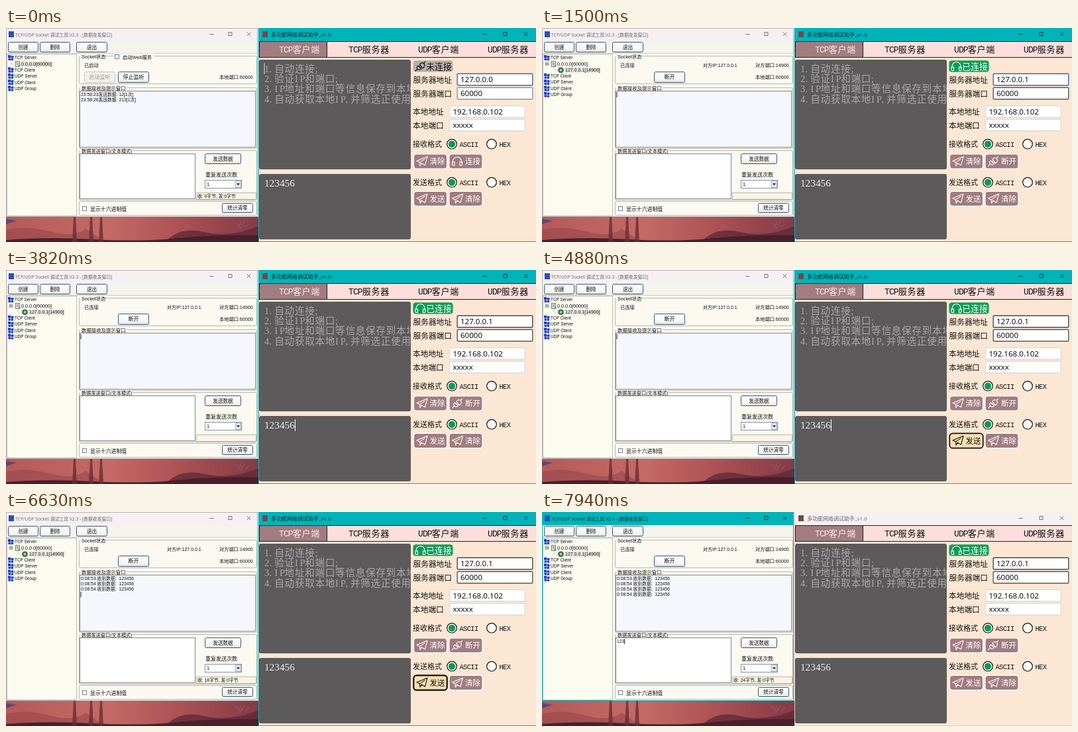
An HTML page for the animation above (8000 ms loop, 800 px wide and 324 px high).

```html
<!DOCTYPE html>
<html lang="zh-CN">
<head>
<meta charset="utf-8">
<title>TCP debugging demo</title>
<style>
html, body { margin: 0; width: 100%; height: 100%; overflow: hidden; }
svg { display: block; width: 100vw; height: 100vh; }
text { white-space: pre; font-family: "Liberation Sans", "Noto Sans CJK SC", "Noto Sans CJK", sans-serif; }
.ui { font-family: "Open Sans", "Noto Sans CJK SC", "Noto Sans CJK", sans-serif; }
.mono { font-family: "Liberation Mono", "Noto Sans CJK SC", "Noto Sans CJK", monospace; }
.song { font-family: "Liberation Serif", "Noto Sans CJK SC", "Noto Sans CJK", serif; }
.icon { fill: none; stroke-width: 1.1; stroke-linejoin: round; stroke-linecap: round; }
</style>
</head>
<body>
<svg id="stage" viewBox="0 0 800 324" xmlns="http://www.w3.org/2000/svg"></svg>
<script>
const LOOP = 8000;
const CONNECT = 1380;
const SENDS = [5130, 5880, 6350, 6700];
const STAMPS = ['0:08:53', '0:08:54', '0:08:54', '0:08:54'];
const TEAL = '#00b4b9', PALE = '#f6f0f3', PEACH = '#fbe7d3', MAUVE = '#a17c80', PANE = '#fcf9f1';

const rect = (x, y, w, h, fill, more = '') =>
  `<rect x="${x}" y="${y}" width="${w}" height="${h}" fill="${fill}" ${more}/>`;
const box = (x, y, w, h, fill, stroke, more = '') =>
  rect(x + .5, y + .5, w - 1, h - 1, fill, `stroke="${stroke}" ${more}`);
const path = (d, more = '') => `<path d="${d}" ${more}/>`;
const text = (x, y, s, size, fill = '#111', more = '') =>
  `<text x="${x}" y="${y}" font-size="${size}" fill="${fill}" ${more}>${s}</text>`;
const group = (id, body, more = '') => `<g id="${id}" ${more}>${body}</g>`;

// Fixed-pitch text: Han characters take a full cell, the rest half a cell.
function cells(x, y, s, cell, fill, font, size = cell) {
  const xs = [];
  for (const c of s) {
    xs.push(x.toFixed(1));
    x += c > '\u2e80' ? cell : cell / 2;
  }
  return text(xs.join(' '), y, s, size, fill, `class="${font}"`);
}

// closeX is the centre of the close button, gap the pitch of the three buttons.
function titleBar(id, x, w, label, labelX, size, iconFill, iconX, closeX, gap) {
  const mid = closeX - gap, low = closeX - 2 * gap;
  return rect(x, 0, w, 20, PALE, `id="${id}Bar"`) +
    rect(iconX, 5, 8, 9, iconFill) +
    group(id + 'Title', text(labelX, 13, label, size, 'currentColor', 'class="ui"') +
      path(`M${low - 3} 9.5h6M${mid - 2.5} 6.5h5v5h-5zM${closeX - 2.7} 6.5l5.5 5.5m0 -5.5l-5.5 5.5`,
        'fill="none" stroke="currentColor" stroke-width=".9"'));
}

/* ---- desktop ---- */

function desktop() {
  let s = rect(0, 284, 382, 40, 'url(#dusk)');
  s += path('M0 306Q30 298 66 308T120 304L150 324H0Z', 'fill="#9a474b" opacity=".6"');
  s += path('M240 324Q262 300 300 309T382 300V324Z', 'fill="#5f2734" opacity=".75"');
  s += path('M0 321Q60 316 130 320T260 318T382 314V324H0Z', 'fill="#48202c"');
  s += path('M102 286h3l2 38h-7zM127 286h3l2 38h-7zM142 286h3l2 38h-7z', 'fill="#6b2c36" opacity=".8"');
  s += path('M0 289l16 3-16 5z', 'fill="#5a4878"');
  s += path('M345 294l7 5m3 -6l-4 10m9 -11l-7 13m13 -9l-4 5', 'stroke="#8479b5" stroke-width=".8" opacity=".7"');
  return s;
}

/* ---- left window ---- */

const plain = (x, y, s, size = 7.3, fill, more) => text(x, y, s, size, fill, more);

function button(x, y, w, h, label, size = 7.6, off = false) {
  return box(x, y, w, h, off ? '#f3f2ea' : 'url(#face)', off ? '#c5c3b8' : '#38577d', 'rx="2"') +
    plain(x + w / 2, y + h / 2 + 2.9, label, size, off ? '#9a998f' : '#111', 'text-anchor="middle"');
}

function frame(x, y, w, h, label, labelW, size = 7.2) {
  return box(x, y, w, h, 'none', '#b9b8ac', 'rx="2"') +
    (label ? rect(x + 2, y - 2, labelW + 3, 5, PANE) + plain(x + 4, y + 3.6, label, size) : '');
}

const netIcon = y => path(`M3 ${y - 4}h4v4h-4zM7.5 ${y - 3}h4v3.4h-4zM3.5 ${y + .6}h3.4v3.4h-3.4zM7.5 ${y + 1}h3.6v3h-3.6z`,
  'fill="#1c3fc8"');
const node = (y, s) => netIcon(y) + plain(13, y + 2.4, s, 6.4);

function leftWindow() {
  const check = (x, y) => box(x, y, 7, 7, '#fff', '#4a6480', 'stroke-width=".8"');
  const stem = 'fill="none" stroke="#8a8a8a" stroke-width=".7" stroke-dasharray="1 1"';

  let s = rect(0, 0, 380, 286, PANE);
  s += titleBar('left', 0, 380, 'TCP/UDP Socket 调试工具 V2.3 - [数据收发窗口]', 14, 6.8, '#2450c0', 4, 366.5, 28);
  s += rect(1, 20, 378, 18, '#f4f3ec') + rect(1, 38, 378, 1, '#cfcec4');
  s += button(3, 21, 46, 16, '创建') + button(51, 21, 46, 16, '删除') + button(106, 21, 47, 16, '退出');

  s += box(1, 39, 106, 246, '#fbfbf0', '#bdbcb2');
  s += node(45, 'TCP Server');
  s += path('M7.5 49V54.5H14', stem) + rect(22, 50, 49, 9, '#e9e8df', 'id="rootMark"');
  s += box(14, 50, 7, 9, '#e6ebe4', '#59605c', 'stroke-width=".8"') +
    path('M16 53h3m-3 2h3m-1 2h4', 'stroke="#33804a" stroke-width=".9"');
  s += plain(23, 57, '0.0.0.0[60000]', 7.2);
  s += group('child', box(5, 52, 5, 5, '#fff', '#777', 'stroke-width=".8"') +
    path('M6 54.5h3', 'stroke="#111" stroke-width=".7"') +
    path('M18 59.5V64H24', stem) + rect(34, 59.5, 55, 9, '#e9e8df') +
    '<circle cx="28.5" cy="63.8" r="3.8" fill="#3d9b52" stroke="#23352a"/><circle cx="28.5" cy="63.8" r="1.3" fill="#d8f0dc"/>' +
    plain(35, 66.3, '127.0.0.1[14900]', 7));
  s += group('others', ['TCP Client', 'UDP Server', 'UDP Client', 'UDP Group']
    .map((name, i) => node(63.5 + i * 9.3, name)).join(''));

  s += frame(110, 42, 269, 43, 'Socket状态', 34);
  s += group('idle', rect(163, 38.5, 60, 9, PANE) + check(164, 40) + plain(176, 46.6, '启动Web服务') +
    plain(118, 59, '已启动') + button(118, 66, 47, 17, '启动监听', 8, true) + button(169, 66, 47, 17, '停止监听', 8));
  s += group('linked', plain(118, 59, '已连接') + plain(243, 58.5, '对方IP:127.0.0.1', 7) +
    plain(322, 58.5, '对方端口:14900', 7.2) + button(169, 66, 47, 17, '断开', 8));
  s += plain(322, 77, '本地端口:60000', 7.2);

  s += frame(110, 90, 269, 93, '数据接收及提示窗口', 67, 7.4);
  s += box(111, 95, 266, 86, '#f6f7fd', '#80858c');
  s += group('oldLog', plain(113, 103, '23:58:23发送数据: 12[1次]', 6.8) + plain(113, 111.2, '23:58:26发送数据: 213[1次]', 6.8));
  s += STAMPS.map((stamp, i) => group('log' + i, plain(113, 103 + i * 8, stamp + ' 收到数据:  123456', 6.8))).join('');
  s += rect(112.6, 97, .9, 8, '#111', 'id="logCaret"');

  s += frame(110, 185, 269, 76, '数据发送窗口(文本模式)', 76, 7.2);
  s += box(111, 190, 175, 69, '#fff', '#80858c');
  s += plain(113, 198, '', 6.8, '#111', 'id="typed"') + rect(123.6, 192, .9, 8, '#111', 'id="typedCaret"');
  s += button(300, 190, 55, 16, '发送数据');
  s += plain(301, 225, '重复发送次数', 8);
  s += box(300, 230, 56, 13, '#fff', '#8296ab') + plain(303, 239.3, '1', 7.5);
  s += box(346, 231, 9, 11, '#dfe8f5', '#a9b9cf') + path('M348 235.2h5l-2.5 3z', 'fill="#222"');
  s += box(287, 249, 91, 11, '#f8f4e9', '#bbb9a9') + plain(289, 257, '', 6.8, '#111', 'id="bytes"');
  s += frame(110, 262, 269, 22);
  s += check(115, 270) + plain(127, 276.6, '显示十六进制值', 7.9);
  s += button(326, 265, 47, 15, '统计清零');
  s += box(0, 0, 380, 286, 'none', '#b8b1b2', 'id="leftEdge"');
  return s;
}

/* ---- right window ---- */

const planeIcon = (x, y) => path(`M${x} ${y + 6.5}L${x + 16} ${y}L${x + 12.5} ${y + 13}L${x + 7} ${y + 10}L${x + 5} ${y + 14}L${x + 4.5} ${y + 8.8}ZM${x + 4.5} ${y + 8.8}L${x + 12} ${y + 3.6}`,
  'class="icon" stroke="currentColor"');
const phonesIcon = (x, y) => path(`M${x + 1} ${y + 9}V${y + 7}a6.5 6.5 0 0 1 13 0v2M${x} ${y + 8}h3.5v5.5h-2a1.5 1.5 0 0 1-1.5-1.5zM${x + 15} ${y + 8}h-3.5v5.5h2a1.5 1.5 0 0 0 1.5-1.5z`,
  'class="icon" stroke="currentColor"');
const plugIcon = (x, y) => path(`M${x} ${y + 14}l3-3M${x + 3} ${y + 11}q-2-3 1-5l5 5q-2 3-6 0M${x + 12} ${y + 3}l3-3M${x + 6.5} ${y + 4}l2-2q3-1 4.5 1q2 2 0 5l-2 2zM${x + 6} ${y + 7.5}l1.5-1.5M${x + 8} ${y + 9.5}l1.5-1.5`,
  'class="icon" stroke="currentColor"');

function pill(id, x, y, label, icon) {
  return group(id, rect(x + .8, y + .8, 50.4, 22.4, MAUVE, 'rx="4.5" stroke="#fff" stroke-width="1.5"') +
    icon(x + 5.5, y + 4.8) + text(x + 25, y + 16.2, label, 11.5, 'currentColor', 'class="ui"'), 'color="#fff"');
}

function radio(x, y, label, on) {
  return `<circle cx="${x}" cy="${y}" r="7.3" fill="#fff" stroke="#151515" stroke-width="1.2"/>` +
    (on ? `<circle cx="${x}" cy="${y}" r="5.2" fill="#0c9a58"/>` : '') +
    cells(x + 11.4, y + 4, label, 11.3, '#111', 'mono', 10.4);
}

function badge(id, fill, ink, label, icon) {
  return group(id, rect(614.5, 49.3, 60, 17.2, fill, 'rx="4"') + icon(618, 51) +
    text(634.3, 62.7, label, 12.8, 'currentColor', 'class="ui"'), `color="${ink}"`);
}

function rightWindow() {
  const label = (x, y, s, size = 11.7) => text(x, y, s, size, '#111', 'class="ui"');
  const input = (id, x, y, value, stroke) =>
    rect(x + .7, y + .7, 113.6, 17.6, '#fff', `id="${id}Box" stroke="${stroke}" stroke-width="1.4" rx="1"`) +
    text(x + 5.4, y + 13.7, value, 11.6, '#000', `id="${id}" class="ui"`);

  let s = rect(380, 0, 2, 286, '#e9e2e3') + rect(381, 0, 419, 324, PEACH);
  s += titleBar('right', 381, 419, '多功能网络调试助手_v1.0', 400, 8, '#6d4b4b', 387, 784.5, 31);
  s += rect(382, 20, 418, 25, '#fcdfdc');
  s += rect(382, 20, 418, 1, '#222') + rect(382, 44, 418, 1, '#222');
  s += box(382, 20, 103, 25, MAUVE, '#222');
  s += ['TCP客户端', 'TCP服务器', 'UDP客户端', 'UDP服务器']
    .map((name, i) => cells(412 + i * 105, 36.5, name, 13.8, i ? '#111' : '#f5ecec', 'mono', 13)).join('');

  s += rect(382, 48, 229, 166, '#5d5a5b', 'rx="3"') + rect(382, 221, 229, 99, '#5d5a5b', 'rx="3"');
  const hints = ['1.自动连接;', '2.验证IP和端口;', '3.IP地址和端口等信息保存到本地', '4.自动获取本地IP,并筛选正使用的'];
  s += `<g clip-path="url(#pane)">${hints.map((h, i) => cells(390, 66.5 + i * 15.4, h, 15.3, '#aaa7a8', 'song', 14.6)).join('')}</g>`;
  s += rect(389.5, 53, 1, 17, '#ddd', 'id="hintCaret"');
  s += cells(390, 239.5, '123456', 15.3, '#eeecec', 'song') + rect(436, 226, 1, 18, '#fff', 'id="sendCaret"');

  s += badge('offline', '#b7adab', '#111', '未连接', plugIcon);
  s += badge('online', '#0d9c58', '#fff', '已连接', phonesIcon);
  s += label(614.5, 83, '服务器地址') + input('addr', 680.5, 68.5, '127.0.0.0', '#4a4a4a') +
    rect(735, 71.5, 1, 13, '#111', 'id="addrCaret"');
  s += label(614.5, 104, '服务器端口') + input('port', 680.5, 89.5, '60000', '#4a4a4a');
  s += label(614, 131, '本地地址') + input('ip', 669, 117, '192.168.0.102', '#dcdcdc');
  s += label(614, 151.5, '本地端口') + input('local', 669, 137.5, 'xxxxx', '#dcdcdc');
  s += label(614, 180, '接收格式', 11) + radio(673, 175.7, 'ASCII', true) + radio(733, 175.7, 'HEX');
  s += pill('clearIn', 614.5, 190, '清除', planeIcon);
  s += pill('open', 668, 190, '连接', phonesIcon) + pill('shut', 668, 190, '断开', plugIcon);
  s += label(614, 238, '发送格式', 11) + radio(673, 233.7, 'ASCII', true) + radio(733, 233.7, 'HEX');
  s += pill('send', 614.5, 246.5, '发送', planeIcon) + pill('clearOut', 668, 246.5, '清除', planeIcon);
  s += path('M381.5 0V323.5H800', `id="rightEdge" fill="none" stroke="${TEAL}"`);
  return s;
}

const defs = `<defs>
<linearGradient id="dusk" gradientUnits="userSpaceOnUse" x1="0" x2="382">
<stop offset="0" stop-color="#b45a59"/><stop offset=".4" stop-color="#c56a65"/><stop offset=".65" stop-color="#b05558"/><stop offset="1" stop-color="#843a45"/></linearGradient>
<linearGradient id="face" x2="0" y2="1"><stop offset="0" stop-color="#fff"/><stop offset=".75" stop-color="#f5f5ef"/><stop offset="1" stop-color="#dcdad0"/></linearGradient>
<clipPath id="pane">${rect(382, 48, 229, 166, '#000')}</clipPath></defs>`;

const stage = document.getElementById('stage');
stage.innerHTML = defs + desktop() + leftWindow() + rightWindow();

const el = id => document.getElementById(id);
const show = (id, on) => el(id).setAttribute('visibility', on ? 'visible' : 'hidden');
const set = (id, attrs) => Object.entries(attrs).forEach(([k, v]) => el(id).setAttribute(k, v));
const write = (id, s) => { if (el(id).textContent !== s) el(id).textContent = s; };
const between = (t, a, b) => t >= a && t < b;
const blink = (t, start) => (t - start) % 1000 < 500;

function activate(id, on, edge) {
  set(id + 'Bar', { fill: on ? TEAL : PALE });
  set(id + 'Title', { color: on ? '#10282a' : '#686466' });
  set(id + 'Edge', { stroke: on ? TEAL : edge });
}

function update(t) {
  const linked = t >= CONNECT;
  const sent = SENDS.filter(at => t >= at).length;

  activate('left', t >= 7310, '#b8b1b2');
  activate('right', t < 7130, '#d8cfd0');

  for (const id of ['child', 'linked', 'online', 'shut']) show(id, linked);
  for (const id of ['idle', 'oldLog', 'offline', 'open', 'rootMark']) show(id, !linked);
  set('others', { transform: `translate(0 ${linked ? 9.3 : 0})` });

  STAMPS.forEach((_, i) => show('log' + i, i < sent));
  show('logCaret', linked && t < 7130);
  set('logCaret', { y: 97 + sent * 8 });
  write('bytes', linked && !sent ? '' : `收: ${sent * 6}字节, 发:0字节`);

  write('addr', '127.0.0.' + (t < 820 ? '0' : t < 1000 ? '' : '1'));
  set('addrBox', { stroke: t < 2690 ? '#3b6da8' : '#4a4a4a' });
  set('portBox', { stroke: t < 630 ? '#8c96ad' : '#5a5a5a' });
  show('hintCaret', t < 380);
  show('addrCaret', between(t, 570, 1000) || between(t, 1000, 3600) && blink(t, 1000));
  set('addrCaret', { x: 687 + el('addr').getComputedTextLength() });
  show('sendCaret', between(t, 3600, 3800) || between(t, 3800, SENDS[0]) && blink(t, 3800));

  const hover = between(t, 4500, 7070);
  const focus = t >= SENDS[0];
  set('send', { color: hover ? '#111' : '#fff' });
  const face = el('send').firstElementChild;
  face.setAttribute('fill', hover ? '#f9dfb3' : MAUVE);
  face.setAttribute('stroke', hover ? '#111' : '#fff');
  face.setAttribute('stroke-width', hover ? (focus ? 2.2 : 1.7) : 1.5);

  const typed = '123'.slice(0, [7750, 7880, 7940].filter(at => t >= at).length);
  write('typed', typed);
  show('typedCaret', t >= 7440);
  set('typedCaret', { x: 113 + el('typed').getComputedTextLength() });
}

const start = performance.now();
function tick() {
  update((performance.now() - start) % LOOP);
  requestAnimationFrame(tick);
}
update(0);
requestAnimationFrame(tick);
</script>
</body>
</html>
```
